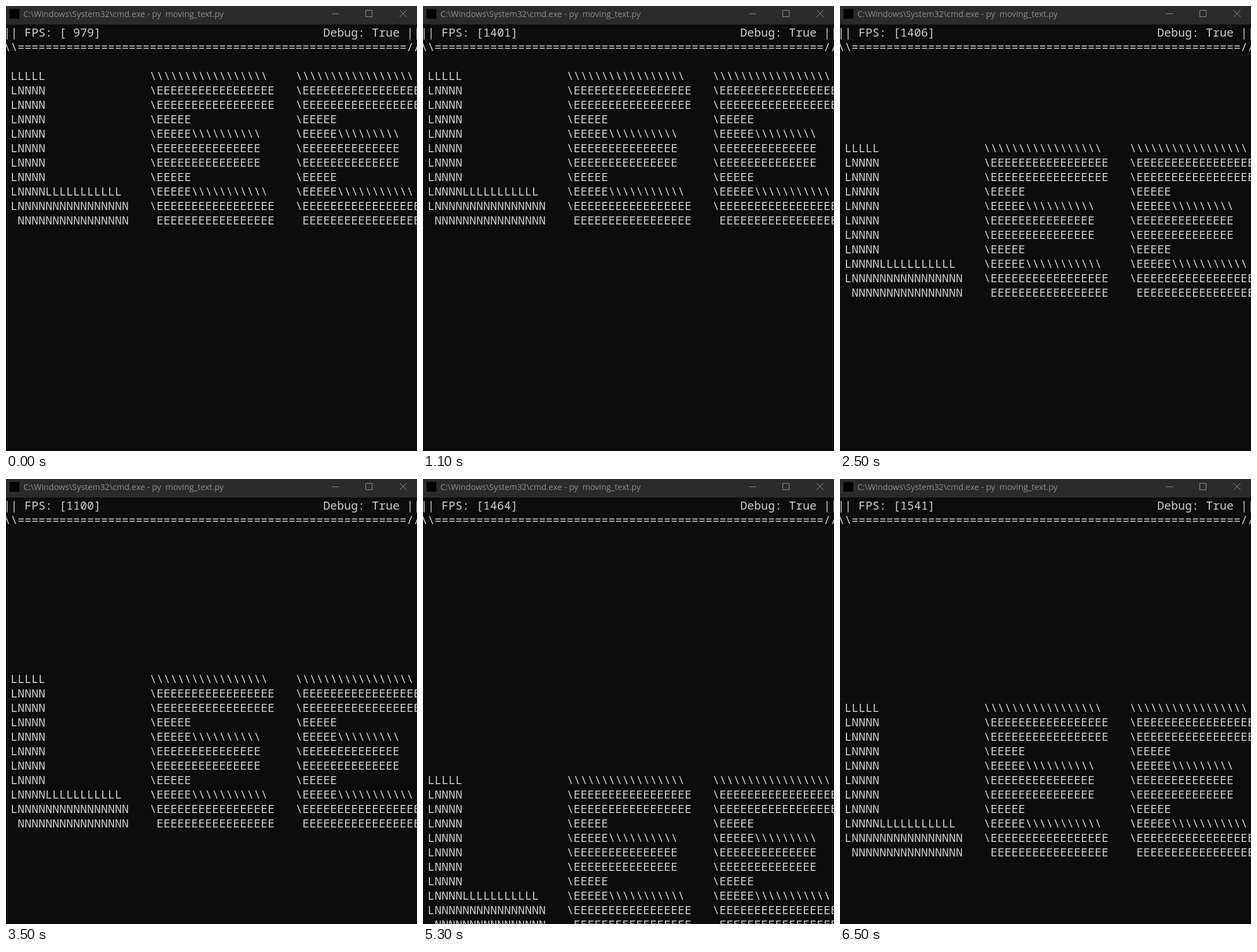
Animation of 710 by 770 pixels, one loop 6600 ms. Source, as an HTML page with a canvas:

```html
<!DOCTYPE html>
<html lang="en">
<head>
<meta charset="utf-8">
<title>Moving text</title>
<style>
  html, body { margin: 0; width: 100%; height: 100%; overflow: hidden; background: #0c0c0c; }
  canvas { display: block; }
</style>
</head>
<body>
<canvas id="stage" width="710" height="770"></canvas>
<script>
const ctx = document.getElementById('stage').getContext('2d');

const LOOP = 6600, TICK = 100;
const CELL_W = 12, CELL_H = 25, LEFT = -4, BASELINE = 53, TITLE_H = 32;
const BACK = '#0c0c0c', INK = '#cccccc', BAR = '#2b2b2b', DIM = '#8c8c8c';

const fpsReadings = [979, 1401, 1406, 1100, 1234, 1464, 1541];

// Rows of one block letter E; the middle arm varies in length.
function letterE(arm) {
  const bar = '\\' + 'E'.repeat(17);
  const stem = '\\EEEEE';
  const middle = '\\' + 'E'.repeat(5 + arm);
  return ['\\'.repeat(17), bar, bar, stem, stem + '\\'.repeat(arm), middle, middle,
          stem, stem + '\\'.repeat(11), bar, ' ' + 'E'.repeat(17)];
}

const letterL = ['LLLLL', ...Array(7).fill('LNNNN'), 'LNNNN' + 'L'.repeat(11),
                 'L' + 'N'.repeat(16), ' ' + 'N'.repeat(16)];
const letters = [letterL, letterE(10), letterE(9)];

function print(text, column, row) {
  ctx.fillText(text, LEFT + column * CELL_W, BASELINE + row * CELL_H);
}

function drawTitleBar() {
  ctx.fillStyle = BAR;
  ctx.fillRect(0, 0, 710, TITLE_H);
  ctx.fillStyle = '#000';
  ctx.fillRect(6, 5, 17, 17);

  ctx.fillStyle = DIM;
  ctx.font = '14.35px "Open Sans", "Noto Sans", sans-serif';
  ctx.fillText('C:\\Windows\\System32\\cmd.exe - py  moving_text.py', 30, 19);

  ctx.strokeStyle = DIM;
  ctx.lineWidth = 1;
  ctx.strokeRect(621.5, 7.5, 11, 11);
  ctx.beginPath();
  ctx.moveTo(563, 13.5);
  ctx.lineTo(575, 13.5);
  ctx.moveTo(680, 7);
  ctx.lineTo(692, 19);
  ctx.moveTo(692, 7);
  ctx.lineTo(680, 19);
  ctx.stroke();
}

// The lettering moves one row per step and bounces off header and bottom edge.
function rowOffset(time) {
  const step = Math.max(0, Math.floor((time - 34) / 258));
  return Math.min(Math.abs(step - 2) - 2, 36 - step);
}

function draw(time) {
  ctx.fillStyle = BACK;
  ctx.fillRect(0, 0, 710, 770);

  ctx.font = '20px "Noto Sans Mono", "DejaVu Sans Mono", monospace';
  ctx.fillStyle = INK;
  const top = 3 + rowOffset(time);
  letters.forEach((rows, i) =>
    rows.forEach((text, r) => print(text, 1 + [0, 20, 41][i], top + r)));

  // The header stays on top of the lettering.
  ctx.fillStyle = BACK;
  ctx.fillRect(0, TITLE_H, 710, 2 * CELL_H);
  ctx.fillStyle = INK;
  const fps = fpsReadings[Math.floor((time + 400) / 1050)];
  print(`|| FPS: [${String(fps).padStart(4)}]`, 0, 0);
  print('Debug: True ||', 46, 0);
  print('\\\\' + '='.repeat(56) + '//', 0, 1);

  drawTitleBar();
}

const start = performance.now();
function frame() {
  const time = (performance.now() - start) % LOOP;
  draw(Math.floor(time / TICK) * TICK);
  requestAnimationFrame(frame);
}
frame();
</script>
</body>
</html>
```
